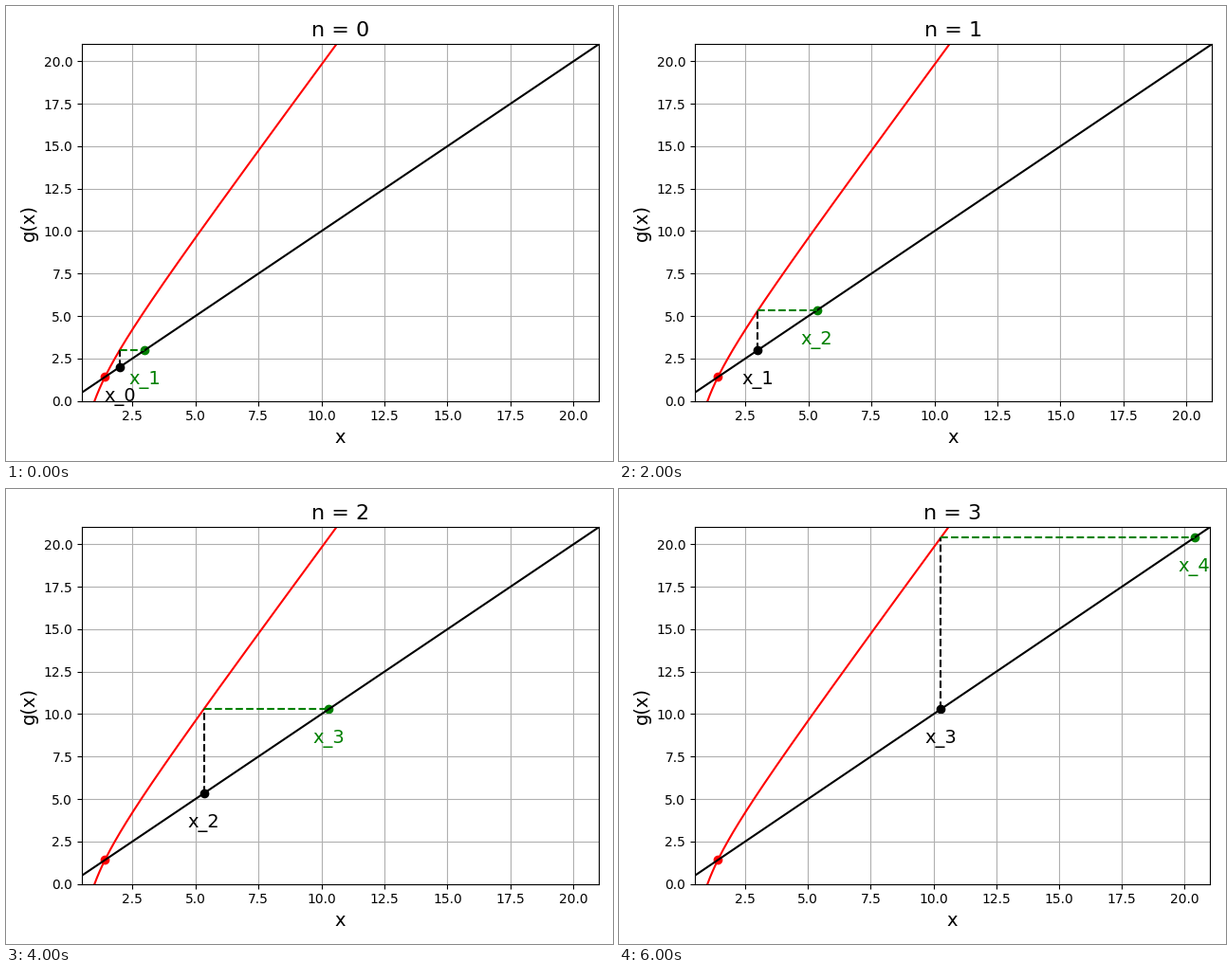
Recreate the animation shown at these times as a matplotlib script. Size 640 px wide and 480 px high, loop 8 s.

```python
import matplotlib.pyplot as plt
import numpy as np
from matplotlib.animation import FuncAnimation

X_START = 2
X_MIN, LIMIT = 0.5, 21
STEPS = 4
WIDTH, HEIGHT, DPI = 640, 480, 100


def g(x):
    return 2 * x - 2 / x


def iterate(n):
    x = X_START
    for _ in range(n):
        x = g(x)
    return x


fig = plt.figure(figsize=(WIDTH / DPI, HEIGHT / DPI), dpi=DPI)
xs = np.linspace(X_MIN, LIMIT, 1000)


def mark(ax, x, color, label):
    ax.scatter(x, x, color=color)
    ax.text(x, x - 2, label, color=color, fontsize=14, ha="center")


def draw(n):
    fig.clf()
    # Start from the default margins so the fitted layout depends only on n.
    fig.subplots_adjust(left=0.125, right=0.9, bottom=0.11, top=0.88)
    ax = fig.add_subplot()
    x, x_next = iterate(n), iterate(n + 1)

    ax.plot(xs, g(xs), color="red")
    ax.plot(xs, xs, color="black")
    ax.scatter(np.sqrt(2), np.sqrt(2), color="red")
    ax.plot([x, x], [x, x_next], "--", color="black")
    ax.plot([x, x_next], [x_next, x_next], "--", color="green")
    mark(ax, x, "black", f"x_{n}")
    mark(ax, x_next, "green", f"x_{n + 1}")

    ax.set_xlim(X_MIN, LIMIT)
    ax.set_ylim(0, LIMIT)
    ax.set_title(f"n = {n}", fontsize=16)
    ax.set_xlabel("x", fontsize=14)
    ax.set_ylabel("g(x)", fontsize=14)
    ax.grid(True)
    # Leave one spare pixel above the title.
    fig.tight_layout(rect=(0, 0, 1, 1 - 1 / HEIGHT))
    return ax.get_children()


anim = FuncAnimation(fig, draw, frames=STEPS, interval=2000,
                     init_func=lambda: [], repeat=True, repeat_delay=0)
plt.show()
```
